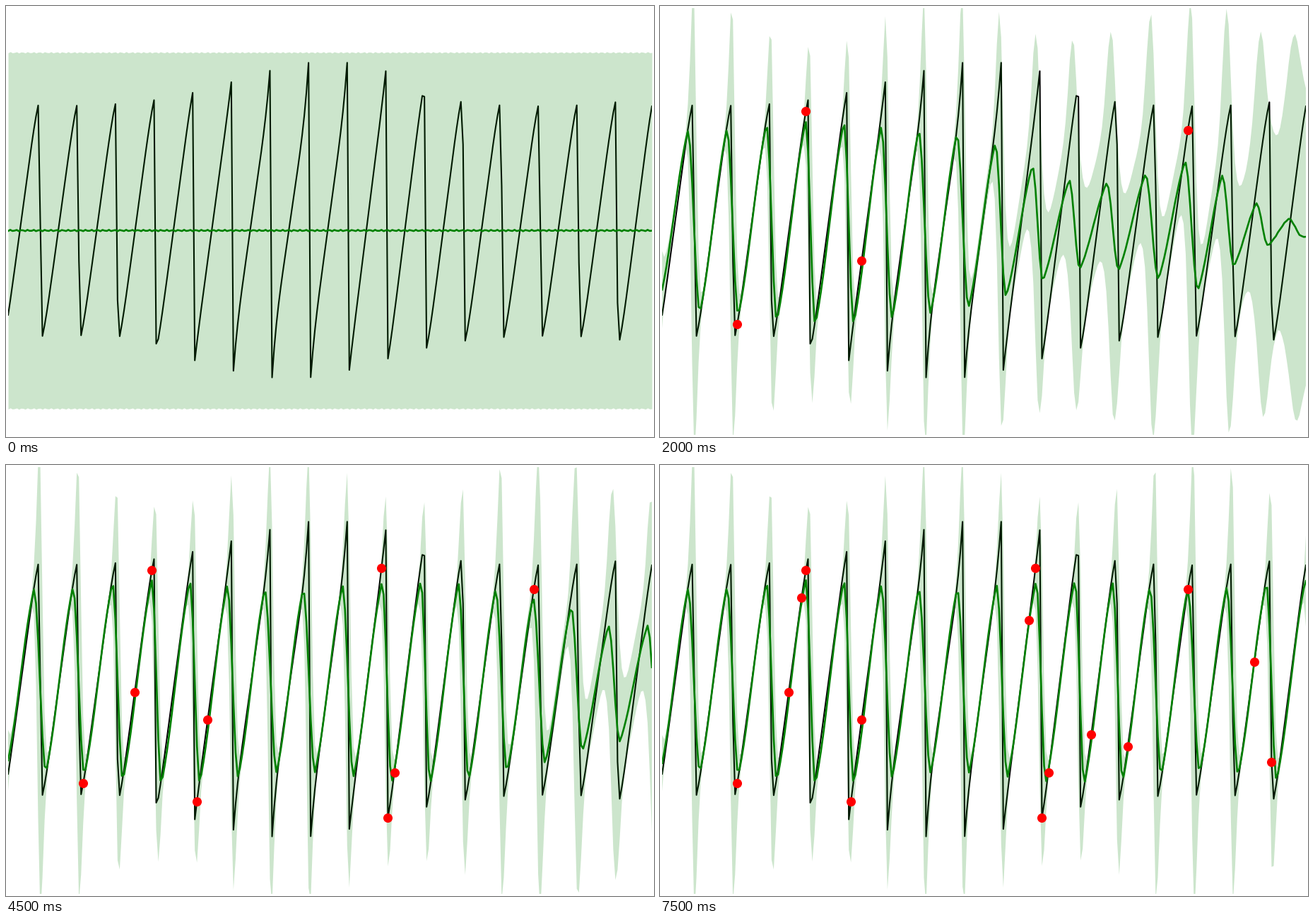
A matplotlib script that plays this animation: 917x611 px, repeating every 8000 ms.

```python
import numpy as np
import matplotlib.pyplot as plt
from matplotlib.animation import FuncAnimation

W, H, PAD = 917, 611, 3
FRAMES, INTERVAL = 16, 500
SAMPLES = np.arange(301)
X = np.linspace(PAD, W - PAD, len(SAMPLES))
PRIOR_MEAN, PRIOR_SPREAD = 318.3, 252.5

# Sample positions in the order they are observed.
OBSERVED = [35, 67, 93, 245, 174, 180, 59, 88, 177, 276, 171, 65, 200, 217, 284]

# Model uncertainty along x, one profile for each stage of learning.
STAGES = [
    {3: 55, 30: 20, 150: 5, 230: 6, 305: 30, 357: 80, 437: 128, 540: 172, 914: 220},
    {3: 30, 20: 6, 400: 6, 470: 22, 520: 50, 600: 78, 650: 75, 770: 35, 835: 90, 914: 170},
    {3: 18, 20: 5, 680: 6, 790: 22, 850: 54, 914: 56},
    {3: 15, 20: 5, 914: 5},
]
PROFILES = np.array([np.interp(X, list(s), list(s.values())) for s in STAGES])


def bump(k, center, width=2.9):
    return np.exp(-((k - center) / width) ** 2)


def envelope(k, center):
    return sum(bump(k, center + 12.4 * j) for j in (-1, 0, 1))


def crest(k):
    return 135 - 65 * envelope(k, 7.2)


def dip(k):
    return 475 + 65 * envelope(k, 6.6)


def sawtooth(t, first=14.745, period=17.923, fall=0.5):
    """Slow rise and sudden fall, with edges sharpest in the tallest teeth."""
    k = np.floor((t - first) / period)
    tau = t - first - k * period
    u = 2 * (tau - fall) / (period - fall) - 1
    curve = -0.13 + 0.35 * bump(k + 1, 7, 2.3)
    s = (1 - curve) * u + curve * u ** 5
    low, high = dip(k), crest(k + 1)
    rising = (low + high) / 2 + (high - low) / 2 * s
    falling = crest(k) + (low - crest(k)) * tau / fall
    return np.where(tau < fall, falling, rising)


TRUTH = sawtooth(SAMPLES)
RIPPLE = np.sin(2 * np.pi * X / 8.2)
TEETH = np.arange(-1, 17)
SWELL = np.cos(2 * np.pi * TEETH / 6.5)


def uncertainty(frame):
    stage = np.interp(frame, [2, 4, 6, 9, 10], [0, 1, 2, 2, 3])
    i = min(int(stage), len(PROFILES) - 2)
    return PROFILES[i] + (stage - i) * (PROFILES[i + 1] - PROFILES[i])


def knots(x, y, unsure, drift):
    """Doubt pulls an extreme towards the middle and to the left."""
    u = np.interp(x, X, unsure)
    keep = np.exp(-(u / 85) ** 1.3)
    return x - drift * (u / 200) ** 1.3, 315 + (y - 315) * keep


def prediction(frame):
    unsure = uncertainty(frame)
    px, py = knots(41.5 + 54.4 * TEETH - 1.8 * SWELL, 166 + 7 * SWELL, unsure, 30)
    tx, ty = knots(56.7 + 54.4 * TEETH, 447 - 9 * SWELL, unsure, 22)

    knot_x = np.column_stack((px, tx)).ravel()
    knot_y = np.column_stack((py, ty)).ravel()
    seg = np.clip(np.searchsorted(knot_x, X) - 1, 0, len(knot_x) - 2)
    u = np.clip((X - knot_x[seg]) / (knot_x[seg + 1] - knot_x[seg]), 0, 1)
    smooth = (1 - np.cos(np.pi * u)) / 2
    s = np.where(seg % 2 == 0, smooth, 0.65 * u + 0.35 * smooth)
    mean = knot_y[seg] + (knot_y[seg + 1] - knot_y[seg]) * s

    # The spread spikes at every sudden fall.
    center = (px + tx) / 2
    doubt = np.minimum(np.interp(center, X, unsure) / 160, 1)
    height = 275 + 52 * SWELL * (1 - doubt)
    distance = np.abs(X - center[:, None]) / (5 + 0.06 * unsure)
    spikes = (height[:, None] - unsure) * np.exp(-distance ** 1.8)
    spread = unsure + spikes.max(axis=0)

    known = min(frame / 2, 1)
    mean = PRIOR_MEAN + known * (mean - PRIOR_MEAN)
    spread = PRIOR_SPREAD + known * (spread - PRIOR_SPREAD)
    floor = PRIOR_SPREAD + known * (unsure - PRIOR_SPREAD)
    return mean + RIPPLE * floor / 260, spread


fig = plt.figure(figsize=(W / 100, H / 100), dpi=100, facecolor="white")
ax = fig.add_axes([PAD / W, PAD / H, 1 - 2 * PAD / W, 1 - 2 * PAD / H])
ax.set_xlim(PAD, W - PAD)
ax.set_ylim(H - PAD, PAD)
ax.axis("off")

ax.plot(X, TRUTH, color="black", lw=1.5, zorder=1)
band = ax.fill_between(X, X, X, color="green", alpha=0.2, lw=0, zorder=2)
fit, = ax.plot([], [], color="green", lw=1.9, zorder=3)
dots, = ax.plot([], [], "o", color="red", ms=8.6, mew=0.8, zorder=4)


def draw(frame):
    mean, spread = prediction(frame)
    top = np.column_stack((X, mean - spread))
    bottom = np.column_stack((X, mean + spread))
    band.set_verts([np.concatenate((top, bottom[::-1]))])
    fit.set_data(X, mean)
    seen = OBSERVED[:frame]
    dots.set_data(X[seen], TRUTH[seen])
    return band, fit, dots


anim = FuncAnimation(fig, draw, frames=FRAMES, interval=INTERVAL, repeat=True, repeat_delay=0)
plt.show()
```
